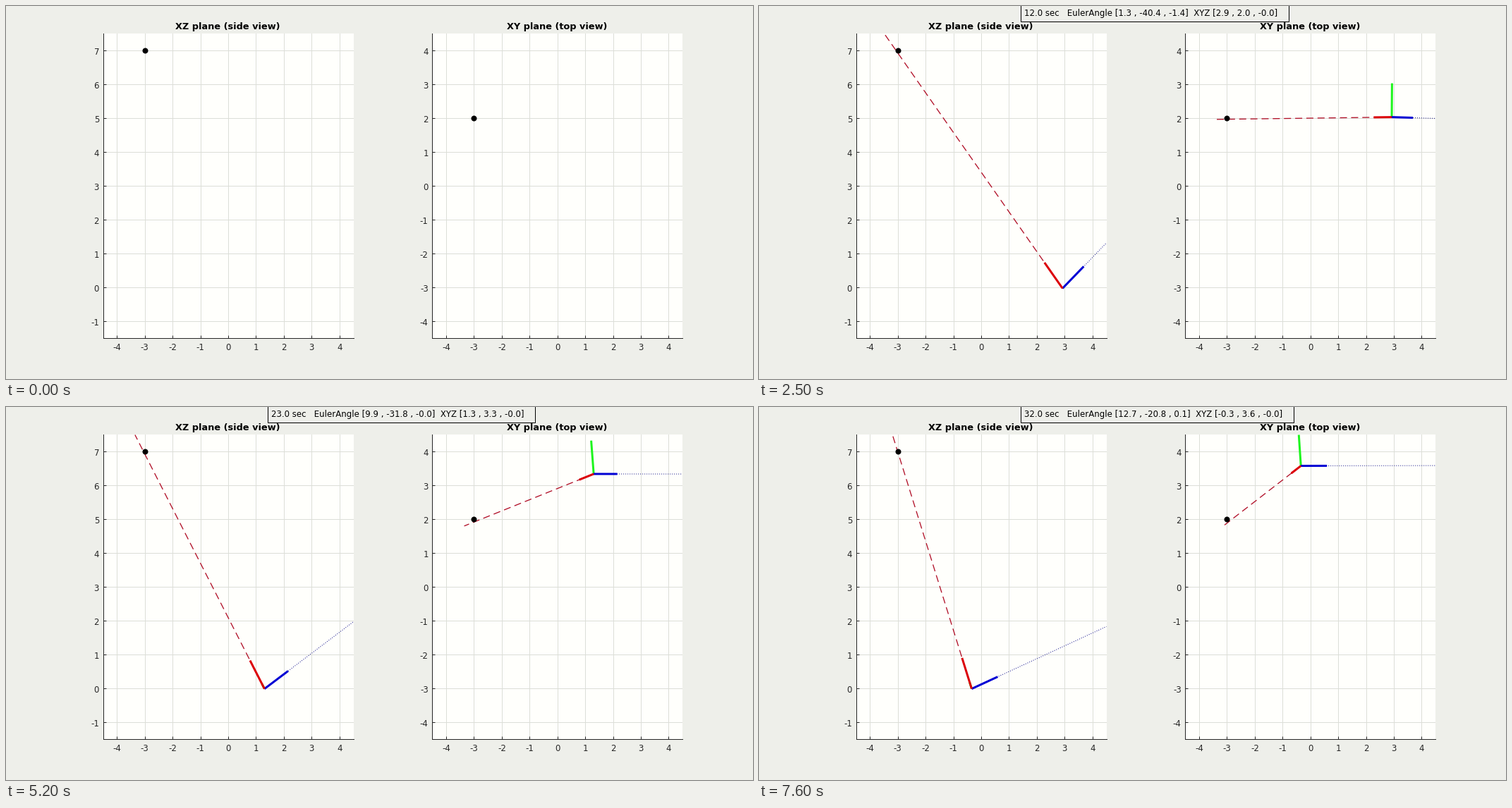
Animation, 1059 px wide and 529 px high, one loop 8000 ms. Source, as a matplotlib script:

```python
import numpy as np
import matplotlib.pyplot as plt
from matplotlib.animation import FuncAnimation
from matplotlib.patches import Rectangle

W, H = 1059, 529
BACK, PAPER, INK = "#eeefea", "#fffffc", "#262626"
RED, GREEN, BLUE = "#dc0008", "#1ef51e", "#0000d4"

plt.rcParams.update({
    "font.family": "DejaVu Sans",
    "font.size": 11.8,
    "axes.unicode_minus": False,
    "lines.scale_dashes": False,
})

# 72 dpi makes one point equal one pixel
fig = plt.figure(figsize=((W + 0.01) / 72, (H + 0.01) / 72), dpi=72, facecolor=BACK)

TARGET = np.array([-3, 2, 7])
LOW = np.array([-4.5, -4.5, -1.5])
HIGH = np.array([4.5, 4.5, 7.5])

# Ticks of 100 ms at which the clock advances by one second
STEPS = [5, 8, 10, 11, 14, 16, 17, 19, 21, 23, 25, 28, 30, 32, 35, 37,
         40, 41, 44, 47, 50, 52, 55, 58, 60, 63, 66, 69, 71, 74, 76]

# second, roll, pitch, yaw, orbit radius, orbit angle, height
KEYS = np.array([
    [2, -9.0, -48.0, -7.0, 3.42, 1.0, -0.10],
    [5, -5.0, -43.2, -4.6, 3.50, 11.7, -0.06],
    [8, -2.3, -42.1, -2.9, 3.54, 22.1, -0.035],
    [12, 1.3, -40.4, -1.4, 3.565, 34.9, -0.02],
    [17, 5.6, -37.2, -0.4, 3.594, 50.4, -0.008],
    [23, 9.9, -31.8, -0.04, 3.59, 68.7, -0.004],
    [27, 11.8, -27.3, 0.1, 3.593, 80.5, -0.003],
    [32, 12.7, -20.8, 0.1, 3.60, 95.45, -0.003],
])
TIMES, VALUES = KEYS[:, 0], KEYS[:, 1:]
SLOPES = np.gradient(VALUES, TIMES, axis=0)


def pose(sec):
    """Cubic Hermite blend of the key poses: Euler angles and position."""
    i = min(np.searchsorted(TIMES, sec, side="right") - 1, len(TIMES) - 2)
    h = TIMES[i + 1] - TIMES[i]
    u = (sec - TIMES[i]) / h
    v = ((1 + 2 * u) * (1 - u) ** 2 * VALUES[i]
         + u * (1 - u) ** 2 * h * SLOPES[i]
         + u * u * (3 - 2 * u) * VALUES[i + 1]
         + u * u * (u - 1) * h * SLOPES[i + 1])
    a = np.radians(v[4])
    return v[:3], np.array([v[3] * np.cos(a), v[3] * np.sin(a), v[5]])


def rotation(angles):
    (cr, cp, cy), (sr, sp, sy) = np.cos(np.radians(angles)), np.sin(np.radians(angles))
    return np.array([
        [cy * cp, cy * sp * sr - sy * cr, cy * sp * cr + sy * sr],
        [sy * cp, sy * sp * sr + cy * cr, sy * sp * cr - cy * sr],
        [-sp, cp * sr, cp * cr],
    ])


def ray(start, direction, length):
    """Segment from start, cut where it leaves the plotted volume."""
    reach = length
    for s, d, lo, hi in zip(start, direction, LOW, HIGH):
        if abs(d) > 1e-9:
            reach = min(reach, ((hi if d > 0 else lo) - s) / d)
    return np.array([start, start + reach * direction])


class View:
    """One flat projection of the scene."""

    def __init__(self, left, dims):
        self.dims = dims
        i, j = dims
        ax = fig.add_axes([left / W, 1 - 471.5 / H, 355 / W, 432 / H], facecolor=PAPER)
        ax.set(xlim=(LOW[i], HIGH[i]), ylim=(LOW[j], HIGH[j]),
               xticks=range(-4, 5), yticks=range(int(LOW[j]), int(HIGH[j]) + 1))
        ax.set_axisbelow(True)
        ax.grid(color="#dcded8", lw=1)
        ax.tick_params(direction="in", length=4, width=1, color=INK, labelcolor=INK)
        ax.tick_params(axis="x", pad=6.6)
        ax.tick_params(axis="y", pad=5.5)
        for side in ("top", "right"):
            ax.spines[side].set_visible(False)
        for side in ("left", "bottom"):
            ax.spines[side].set(color=INK, linewidth=1)

        def line(color, width, style="-"):
            return ax.plot([], [], color=color, lw=width, ls=style,
                           solid_capstyle="butt", dash_capstyle="butt")[0]

        self.lines = [
            line("#b00d25", 1.3, (0, (10, 5.87))),
            line("#10108a", 1, (0, (1, 2))),
            line(GREEN, 3), line(BLUE, 3), line(RED, 3),
        ]
        ax.plot(TARGET[i], TARGET[j], "o", color="black", ms=8, mew=0, zorder=5)

    def show(self, segments):
        for line, seg in zip(self.lines, segments):
            line.set_data(seg[:, self.dims[0]], seg[:, self.dims[1]])


views = [View(137.5, (0, 2)), View(604.2, (0, 1))]

# Pixel overlay for the titles and the status box
over = fig.add_axes([0, 0, 1, 1], zorder=5)
over.set(xlim=(0, W), ylim=(H, 0))
over.axis("off")
for x, title in ((314.7, "XZ plane (side view)"), (781.5, "XY plane (top view)")):
    over.text(x, 33, title, size=12.9, weight="bold", ha="center", va="baseline")
box = over.add_patch(Rectangle((370.5, -2), 377, 24.5, fc=BACK, ec="black", lw=1))
label = over.text(376, 14, "", va="baseline")


def draw(frame):
    passed = sum(step <= frame for step in STEPS)
    active = passed > 0
    for artist in (box, label, *views[0].lines, *views[1].lines):
        artist.set_visible(active)
    if not active:
        return

    sec = passed + 1
    angles, pos = pose(sec)
    ex, ey, ez = rotation(angles).T
    segments = [ray(pos, ez, 20), ray(pos, ex, 20),
                ray(pos, ey, 1), ray(pos, ex, 1), ray(pos, ez, 1)]
    for view in views:
        view.show(segments)

    euler, xyz = (" , ".join(f"{v:.1f}" for v in vec) for vec in (angles, pos))
    label.set_text(f"{sec:.1f} sec   EulerAngle [{euler}]  XYZ [{xyz}]")
    right = 376 + label.get_window_extent().width + 14.5
    box.set_width(round(right) + 0.5 - 370.5)


anim = FuncAnimation(fig, draw, frames=80, interval=100, repeat=True, repeat_delay=0)
plt.show()
```
